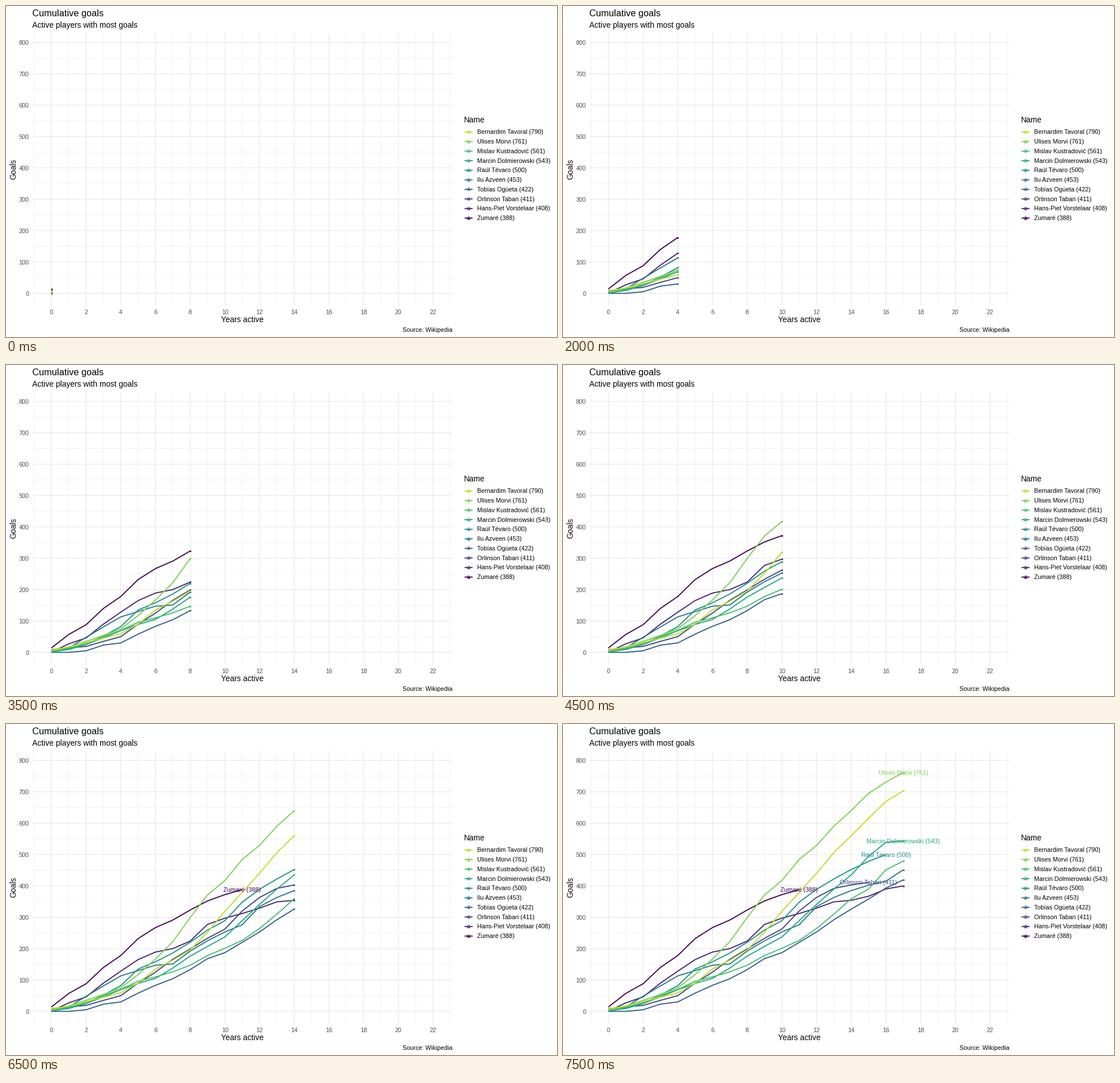
Animation of 966 by 580 pixels, one loop 8000 ms. Source, as a matplotlib script:

```python
import matplotlib.pyplot as plt
from matplotlib.animation import FuncAnimation

W, H, DPI = 966, 580, 100
FRAMES, INTERVAL = 16, 500
PT = 72 / DPI  # points per pixel
GRID, TICK = "#EBEBEB", "#4D4D4D"
LEFT, RIGHT, TOP, BOTTOM = 46, 782.5, 47.5, 525
SMALL, MEDIUM, LARGE = 10.7, 13.75, 16.2

plt.rcParams["font.family"] = "Liberation Sans"
fig = plt.figure(figsize=(W / DPI, H / DPI), dpi=DPI, facecolor="white")
ax = fig.add_axes([0, 0, 1, 1])
ax.set_xlim(0, W)
ax.set_ylim(H, 0)
ax.axis("off")


def px(year):
    return 79.6 + 30.41 * year


def py(goals):
    return 503.5 - 0.5497 * goals


def rule(xs, ys, color, width, **kw):
    return ax.plot(xs, ys, color=color, lw=width * PT, snap=False,
                   solid_capstyle="butt", **kw)[0]


def dot(x, y, color, **kw):
    return ax.plot([x], [y], "o", color=color, ms=3 * PT, mew=0, **kw)[0]


def label(x, y, text, size=SMALL, color="black", ha="left", **kw):
    return ax.text(x, y, text, fontsize=size * PT, color=color, ha=ha,
                   va="baseline", **kw)


def draw_axes():
    for goals in range(0, 801, 50):
        major = goals % 100 == 0
        y = py(goals)
        rule([LEFT, RIGHT], [y, y], GRID, 1.4 if major else 0.7, zorder=1)
        if major:
            label(40.3, y + 4, str(goals), color=TICK, ha="right")
    for year in range(-1, 24):
        major = year % 2 == 0
        x = px(year)
        rule([x, x], [TOP, BOTTOM], GRID, 1.4 if major else 0.7, zorder=1)
        if major:
            label(x, 540, str(year), color=TICK, ha="center")
    label(46, 18, "Cumulative goals", LARGE)
    label(46, 38, "Active players with most goals", MEDIUM)
    label(414, 554, "Years active", MEDIUM, ha="center")
    label(17, 286, "Goals", MEDIUM, ha="center", rotation=90,
          rotation_mode="anchor")
    label(783, 571, "Source: Wikipedia", ha="right")
    label(802.5, 204, "Name", MEDIUM)


class Player:
    count = 0

    def __init__(self, name, total, *goals):
        rank = Player.count
        Player.count += 1
        color = plt.get_cmap("viridis")(rank / 10)
        title = f"{name} ({total})"
        self.goals = goals
        self.last = len(goals) - 1
        self.done = goals[-1] == total
        self.line = rule([], [], color, 1.9, zorder=3 + rank / 100)
        self.dot = dot(0, 0, color, zorder=4 + rank / 100)
        self.tag = label(px(self.last), py(goals[-1]) + 3.9, title,
                         color=color, ha="center", zorder=5 + rank / 100)
        self.draw_key(title, color, 371.6 - 16.76 * rank)

    def draw_key(self, title, color, y):
        rule([804, 818], [y, y], color, 1.9, zorder=3)
        dot(811, y, color, zorder=4)
        label(811, y + 3, "a", color=color, ha="center", zorder=5)
        label(826, y + 3.6, title)

    def show(self, year):
        end = min(year, self.last)
        self.line.set_data([px(t) for t in range(end + 1)],
                           [py(g) for g in self.goals[:end + 1]])
        self.dot.set_data([px(end)], [py(self.goals[end])])
        self.dot.set_visible(year <= self.last)
        self.tag.set_visible(self.done and year >= self.last)


draw_axes()
players = []


def add(*args):
    players.append(Player(*args))


# Running totals by year of career, drawn from the lowest rank up.
add("Zumaré", 388, 14, 57, 88, 140, 178, 232, 267, 291, 323, 352, 372, 388)
add("Hans-Piet Vorstelaar", 408, 1, 27, 46, 90, 128, 165, 189, 200, 224, 277,
    297, 312, 329, 349, 354, 367, 390, 400)
add("Orlinson Tabari", 411, 9, 14, 19, 35, 50, 90, 125, 166, 199, 233, 262,
    320, 363, 392, 403, 411)
add("Tobías Ogüeta", 422, 0, 0, 5, 23, 30, 58, 83, 104, 133, 168, 187, 220,
    253, 292, 326, 358, 393, 419)
add("Ilu Azveen", 453, 5, 14, 48, 81, 113, 130, 147, 151, 192, 225, 253, 276,
    334, 363, 385, 402, 415, 451)
add("Raúl Tévaro", 500, 0, 12, 26, 52, 82, 135, 158, 186, 220, 259, 289, 348,
    389, 422, 452, 478, 500)
add("Marcin Dolmierowski", 543, 2, 9, 25, 46, 69, 89, 105, 138, 176, 207, 237,
    289, 341, 390, 435, 494, 539, 543)
add("Mislav Kustradović", 561, 3, 13, 28, 50, 70, 96, 110, 126, 147, 178, 201,
    226, 264, 310, 359, 390, 451, 479)
add("Ulises Morvi", 761, 4, 17, 35, 54, 75, 117, 167, 222, 299, 371, 417, 484,
    529, 590, 640, 695, 731, 761)
add("Bernardim Tavoral", 790, 8, 17, 31, 45, 59, 90, 135, 163, 196, 252, 319,
    379, 440, 506, 560, 615, 669, 703)


def update(i):
    year = round(1.105 * i)
    for player in players:
        player.show(year)
    return []


anim = FuncAnimation(fig, update, frames=FRAMES, interval=INTERVAL,
                     repeat=True, repeat_delay=0, blit=False)
plt.show()
```
